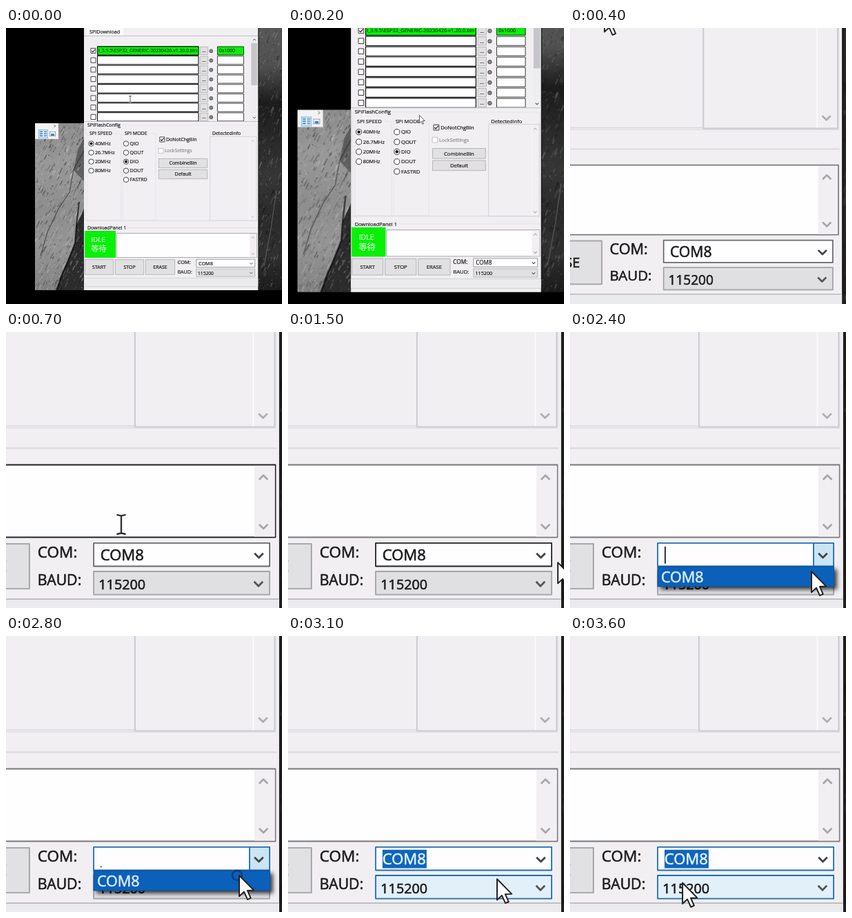
An HTML page with a canvas for the animation above (3.7 s loop, 400 by 400 pixels).

```html
<!DOCTYPE html>
<html>
<head>
<meta charset="utf-8">
<style>
html, body { margin: 0; width: 100%; height: 100%; overflow: hidden; background: #000; }
canvas { display: block; width: 400px; height: 400px; }
</style>
</head>
<body>
<canvas id="stage" width="400" height="400"></canvas>
<script>
const stage = document.getElementById('stage');
const screen = stage.getContext('2d');
const backdrop = document.createElement('canvas');
backdrop.width = backdrop.height = 400;
let ctx = screen;

const LOOP = 3700, STEP = 100;
const FACE = '#f1eff2', INK = '#1c1c1c', LINE = '#d9d8dc', GREEN = '#08f008';
const SANS = '"Open Sans", "Noto Sans", sans-serif';

// cursor path: time, x, y in unzoomed stage coordinates
const PATH = [
  [0, 180, 103], [100, 183, 108], [400, 246, 220.5], [600, 284, 289],
  [700, 289, 326.3], [1200, 358, 346], [1400, 363.7, 344.7], [1600, 363.7, 344.7],
  [1900, 356.3, 341], [2200, 356.3, 341], [2400, 350, 349], [2800, 346, 349],
  [3000, 346, 350.3], [3500, 287.7, 352.6], [3700, 287.7, 352.6]
];
const CLICKS = [[2000, 355.7, 340.7], [2800, 345, 349]];

function cursorAt(t) {
  const i = PATH.findIndex(k => k[0] > t);
  const a = PATH[i - 1], b = PATH[i], u = (t - a[0]) / (b[0] - a[0]);
  return { x: a[1] + (b[1] - a[1]) * u, y: a[2] + (b[2] - a[2]) * u };
}

function zoomAt(t) {
  const u = Math.min(1, t / 610);
  if (u === 0 || u === 1) return 1 + 2 * u;
  const e = u < 0.5 ? 2 ** (20 * u - 10) / 2 : 1 - 2 ** (10 - 20 * u) / 2;
  return 1 + 2 * e;
}

function fill(x1, y1, x2, y2, color) {
  ctx.fillStyle = color;
  ctx.fillRect(x1, y1, x2 - x1, y2 - y1);
}

function box(x1, y1, x2, y2, color, edge, w = 0.5) {
  if (color) fill(x1, y1, x2, y2, color);
  ctx.strokeStyle = edge;
  ctx.lineWidth = w;
  ctx.strokeRect(x1 + w / 2, y1 + w / 2, x2 - x1 - w, y2 - y1 - w);
}

function poly(points, color, w) {
  ctx.beginPath();
  points.forEach(p => ctx.lineTo(p[0], p[1]));
  if (w) {
    ctx.strokeStyle = color;
    ctx.lineWidth = w;
    ctx.stroke();
  } else {
    ctx.fillStyle = color;
    ctx.fill();
  }
}

function circle(x, y, r, color, edge, w) {
  ctx.beginPath();
  ctx.arc(x, y, r, 0, 7);
  if (color) { ctx.fillStyle = color; ctx.fill(); }
  if (edge) { ctx.strokeStyle = edge; ctx.lineWidth = w; ctx.stroke(); }
}

// y is the middle of the capitals; a hairline stroke gives the heavier screen weight
function text(str, x, y, size = 7, color = INK, align = 'left', face = SANS) {
  ctx.font = size + 'px ' + face;
  ctx.textAlign = align;
  ctx.fillStyle = ctx.strokeStyle = color;
  ctx.lineWidth = 0.2;
  ctx.lineJoin = 'round';
  ctx.fillText(str, x, y + size * 0.357);
  ctx.strokeText(str, x, y + size * 0.357);
}

function chevron(x, y, dir, color, r = 2.1) {
  poly([[x - r, y - dir * r / 2], [x, y + dir * r / 2], [x + r, y - dir * r / 2]], color, 0.95);
}

function tick(x, y, on, edge = '#333') {
  box(x - 4, y - 4, x + 4, y + 4, '#fff', edge, 0.9);
  if (on) poly([[x - 2.3, y], [x - 0.7, y + 1.8], [x + 2.5, y - 2]], INK, 1.1);
}

function radios(x, labels, chosen) {
  labels.forEach((label, i) => {
    const y = 167.5 + i * 13.1;
    circle(x, y, 3.7, '#fff', '#333', 0.9);
    if (i === chosen) circle(x, y, 2.1, INK);
    text(label, x + 5.6, y);
  });
}

function button(x1, y1, x2, y2, label) {
  box(x1, y1, x2, y2, '#e1e0e2', '#a9a8ac', 0.7);
  text(label, (x1 + x2) / 2, (y1 + y2) / 2, 7, INK, 'center');
}

function shade(x1, y1, x2, y2, colors) {
  const g = ctx.createLinearGradient(x1, y1, x1, y2);
  colors.forEach((c, i) => g.addColorStop(i / (colors.length - 1), c));
  fill(x1, y1, x2, y2, g);
}

function grain(x1, y1, x2, y2, n, seed, slant, light) {
  let s = seed;
  const rnd = () => (s = s * 16807 % 2147483647) / 2147483647;
  ctx.save();
  ctx.beginPath();
  ctx.rect(x1, y1, x2 - x1, y2 - y1);
  ctx.clip();
  for (let i = 0; i < n; i++) {
    const x = x1 + rnd() * (x2 - x1), y = y1 + rnd() * (y2 - y1), l = 1 + 9 * rnd() ** 3;
    const tone = rnd() < 0.5 ? 10 : light;
    poly([[x, y], [x - slant * l, y + l]],
      `rgba(${tone},${tone},${tone},${0.1 + rnd() * 0.3})`, 0.5 + rnd() * 1.2);
  }
  ctx.restore();
}

function paintBackdrop() {
  ctx = backdrop.getContext('2d');
  fill(0, 0, 400, 400, '#000');
  shade(42, 138, 113, 380, ['#8c8c8c', '#989898', '#8e8e8e', '#959595', '#808080']);
  poly([[113, 160], [104, 176], [98, 206], [113, 222]], 'rgba(40,40,40,.5)');
  poly([[113, 262], [102, 286], [100, 312], [88, 340], [78, 362], [73, 380], [113, 380]], '#2c2c2c');
  grain(42, 138, 113, 380, 900, 71, 0.5, 215);
  poly([[113, 178], [98, 205], [92, 238], [76, 262], [60, 296], [50, 330]], 'rgba(30,30,30,.6)', 1.2);
  poly([[106, 252], [102, 286], [100, 312], [73, 380]], 'rgba(10,10,10,.8)', 1.8);
  box(42, 138, 76, 161, '#f2f2f2', '#ddd');
  box(47, 147, 61, 160, '#cfe8fa', '#5aaee4', 0.7);
  for (let i = 0; i < 3; i++) {
    fill(49, 149.5 + i * 3, 53, 151 + i * 3, '#4a7ca8');
    fill(55, 149.5 + i * 3, 59, 151 + i * 3, '#789');
  }
  box(63, 150, 72, 157, '#fff', '#779', 0.7);
  fill(65, 153, 70, 156, '#3a86c8');
  poly([[69.5, 140], [71.5, 142], [69.5, 144]], '#444', 0.8);

  shade(365, 0, 400, 380, ['#585858', '#505050', '#1c1c1c', '#2a2a2a', '#363636', '#2a2a2a', '#303030', '#1c1c1c']);
  grain(366, 0, 400, 380, 520, 29, 0.4, 170);
  poly([[392, 236], [384, 290], [374, 345]], 'rgba(150,150,150,.5)', 1);
  fill(365, 0, 366.5, 380, '#181818');
  ctx = screen;
}

function fileList() {
  fill(117, 0, 170, 12, '#faf9fb');
  text('SPIDownload', 121, 5, 7.2);
  poly([[113, 11.5], [365, 11.5]], '#b4b3b8', 0.8);
  for (let i = 0; i < 8; i++) {
    const y = 33 + i * 13.7, color = i ? '#fff' : GREEN;
    tick(126.5, y, i === 0);
    box(132, y - 6.7, 279.5, y + 6.7, color, '#161616', 1.1);
    box(281, y - 6, 293, y + 6, '#e1e0e2', '#aaa', 0.7);
    text('...', 287, y, 7, INK, 'center');
    circle(297.3, y + 0.4, 2.5, '#888', '#444', 0.8);
    box(306, y - 6.4, 345, y + 6.4, color, '#333', 0.9);
  }
  text('l_3.9.5\\ESP32_GENERIC-20230426-v1.20.0.bin', 134, 33, 6.8, '#063806');
  text('0x1000', 309, 33, 6.8, '#063806');
  fill(355, 12, 364.5, 135, '#eeedf0');
  fill(355.3, 22, 364.2, 83, '#c6c5c9');
  chevron(360, 17, -1, '#555');
  chevron(360, 130, 1, '#555');
  fill(113, 135.2, 365, 138, FACE);
  poly([[113, 135.5], [365, 135.5]], '#b5b4b8', 0.8);
}

function flashConfig() {
  box(115, 141, 363.8, 280, null, '#dddce0');
  fill(117, 138, 168, 144, FACE);
  text('SPIFlashConfig', 118, 140.5, 7);
  box(118, 153, 167, 278.8, null, '#dddce0');
  box(169, 153, 217, 278.8, null, '#dddce0');
  fill(119.5, 150, 156, 156, FACE);
  fill(171, 150, 207, 156, FACE);
  text('SPI SPEED', 121, 153, 7);
  text('SPI MODE', 172, 153, 7);
  radios(123.5, ['40MHz', '26.7MHz', '20MHz', '80MHz'], 0);
  radios(174, ['QIO', 'QOUT', 'DIO', 'DOUT', 'FASTRD'], 2);
  tick(226.3, 161.5, true);
  text('DoNotChgBin', 232, 161.5, 7);
  tick(224.5, 178, false, '#bcbcc0');
  text('LockSettings', 230, 178, 6.8, '#8c8c90');
  button(221, 189, 292, 203, 'CombineBin');
  button(221, 205, 292, 219, 'Default');
  poly([[115, 278.8], [295.5, 278.8]], LINE, 0.6);

  text('DetectedInfo', 299, 153, 6.8);
  box(295.3, 157, 363.5, 279.5, FACE, '#cbccd2', 0.7);
  poly([[352.8, 158], [352.8, 278.8]], '#fbfafc', 0.6);
  chevron(357.5, 163.5, -1, '#b4b4b8');
  chevron(357.5, 273.8, 1, '#b0b0b4');
}

function downloadPanel(hover) {
  poly([[114, 289.5], [364, 289.5]], LINE, 0.6);
  fill(117, 286, 175, 293, FACE);
  text('DownloadPanel 1', 118, 290, 6.9);
  fill(114, 294, 159, 333, GREEN);
  text('IDLE', 123.5, 307, 9.6, '#d9ffd4');
  text('等待', 123.5, 320.3, 11, '#d9ffd4', 'left', '"Noto Sans CJK SC", "Noto Sans CJK", sans-serif');
  box(160, 297.2, 363.8, 332.8, '#fefdff', hover ? '#222' : '#77777c', 0.6);
  fill(353.3, 298, 363.2, 332.2, FACE);
  chevron(357.7, 303.6, -1, '#a8a8ac');
  chevron(357.7, 327.3, 1, '#a8a8ac');
  button(114, 335.3, 156, 357.7, 'START');
  button(158, 335.3, 200, 357.7, 'STOP');
  button(202, 335.3, 245, 357.7, 'ERASE');
  text('COM:', 248.6, 339.6, 7.5);
  text('BAUD:', 248.6, 353.1, 7.1);
}

function combos(t, at) {
  const open = t >= 2000 && t < 2900, picked = t >= 2900, lit = t >= 2400;
  const blue = '#1f6cb0';
  const baudHover = picked && at.y > 348.7;
  box(275.4, 348.7, 361, 360.5, baudHover ? '#e2f0fa' : '#e0dfe1', baudHover ? blue : '#a4a4a8', 0.6);
  text('115200', 278.1, 355.3, 6.6);
  chevron(355.3, 355, 1, '#555');

  const edge = lit ? blue : t >= 1000 ? '#222' : '#68686c';
  box(275.4, 335, 361, 346.8, '#fefdff', edge, 0.6);
  if (open) box(350.7, 335, 361, 346.8, '#cbe5f5', blue, 0.6);
  chevron(355.5, 341.3, 1, '#444');
  if (picked) fill(279, 336.6, 300.3, 345.5, '#0f66bd');
  if (!open) text('COM8', 278.9, 341.1, 7.35, picked ? '#e6f3ff' : INK);
  else if (t < 2600) fill(279, 337, 279.6, 345.2, '#222');
  else fill(279, 344.4, 279.5, 345.1, '#444');

  if (open) {
    ctx.save();
    ctx.shadowColor = 'rgba(0,0,0,.75)';
    ctx.shadowBlur = 6;
    ctx.shadowOffsetX = ctx.shadowOffsetY = 4;
    fill(275.6, 346.6, 361, 356.2, '#222');
    ctx.restore();
    box(275.6, 346.6, 361, 356.4, lit ? '#0b60ba' : '#fefdff', lit ? '#0b58a8' : '#333', 0.4);
    text('COM8', 277.3, 351.7, 7.2, lit ? '#d8ecfc' : INK);
  }
}

function rings(t) {
  ctx.save();
  ctx.globalCompositeOperation = 'multiply';
  for (const [start, x, y] of CLICKS) {
    const age = t - start;
    if (age < 0 || age > 250) continue;
    ctx.globalAlpha = age ? 0.95 - age / 380 : 0.4;
    const r = (7 + age * 0.14) / 3;
    circle(x, y, r, null, '#d62f40', 1);
    if (r > 5) circle(x, y, r - 4.9, null, '#d62f40', 1);
  }
  ctx.restore();
}

function pointer({ x, y }) {
  const inList = y < 135;
  const inLog = y > 297 && y < 333 && x < 353;
  const inCom = y > 335 && y < 346.8 && x < 350.7;
  ctx.save();
  ctx.translate(x, y);
  if (inList || inLog || inCom) {
    for (const [color, w] of [['rgba(255,255,255,.7)', 1.5], ['#333', 0.8]]) {
      poly([[0, -4.4], [0, 4.4]], color, w);
      for (const s of [-1, 1]) poly([[-2.2, s * 4.7], [0, s * 4.2], [2.2, s * 4.7]], color, w);
    }
  } else {
    ctx.scale(0.6, 0.6);
    const arrow = [[0, 0], [0, 16.8], [3.9, 13.2], [6.7, 19.4], [9.3, 18.3], [6.6, 12.2], [11.8, 12], [0, 0], [0, 1]];
    poly(arrow, '#fff');
    poly(arrow, '#222', 1.1);
  }
  ctx.restore();
}

// softens the magnified view like an enlarged recording
function soften(s) {
  if (s < 1.05) return;
  ctx.setTransform(1, 0, 0, 1, 0, 0);
  ctx.filter = `blur(${0.35 * (s - 1)}px)`;
  ctx.drawImage(stage, 0, 0);
  ctx.filter = 'none';
}

function draw(t) {
  const s = zoomAt(t), at = cursorAt(t), off = 350 * (1 - s);
  ctx.setTransform(s, 0, 0, s, off, off);
  ctx.drawImage(backdrop, 0, 0);
  fill(113, 0, 365.3, 380, FACE);
  fileList();
  flashConfig();
  downloadPanel(at.y > 297 && at.y < 333.5);
  combos(t, at);
  poly([[113, 362.4], [365, 362.4]], '#b9b8bc', 0.6);
  fill(113, 362.7, 365.3, 374.5, '#ebeaec');
  poly([[113, 375], [365, 375]], '#c4c3c7', 0.7);
  rings(t);
  pointer(at);
  soften(s);
}

const began = performance.now();
function loop(now) {
  const t = Math.max(0, now - began) % LOOP;
  draw(Math.floor(t / STEP) * STEP);
  requestAnimationFrame(loop);
}
paintBackdrop();
draw(0);
requestAnimationFrame(loop);
</script>
</body>
</html>
```
